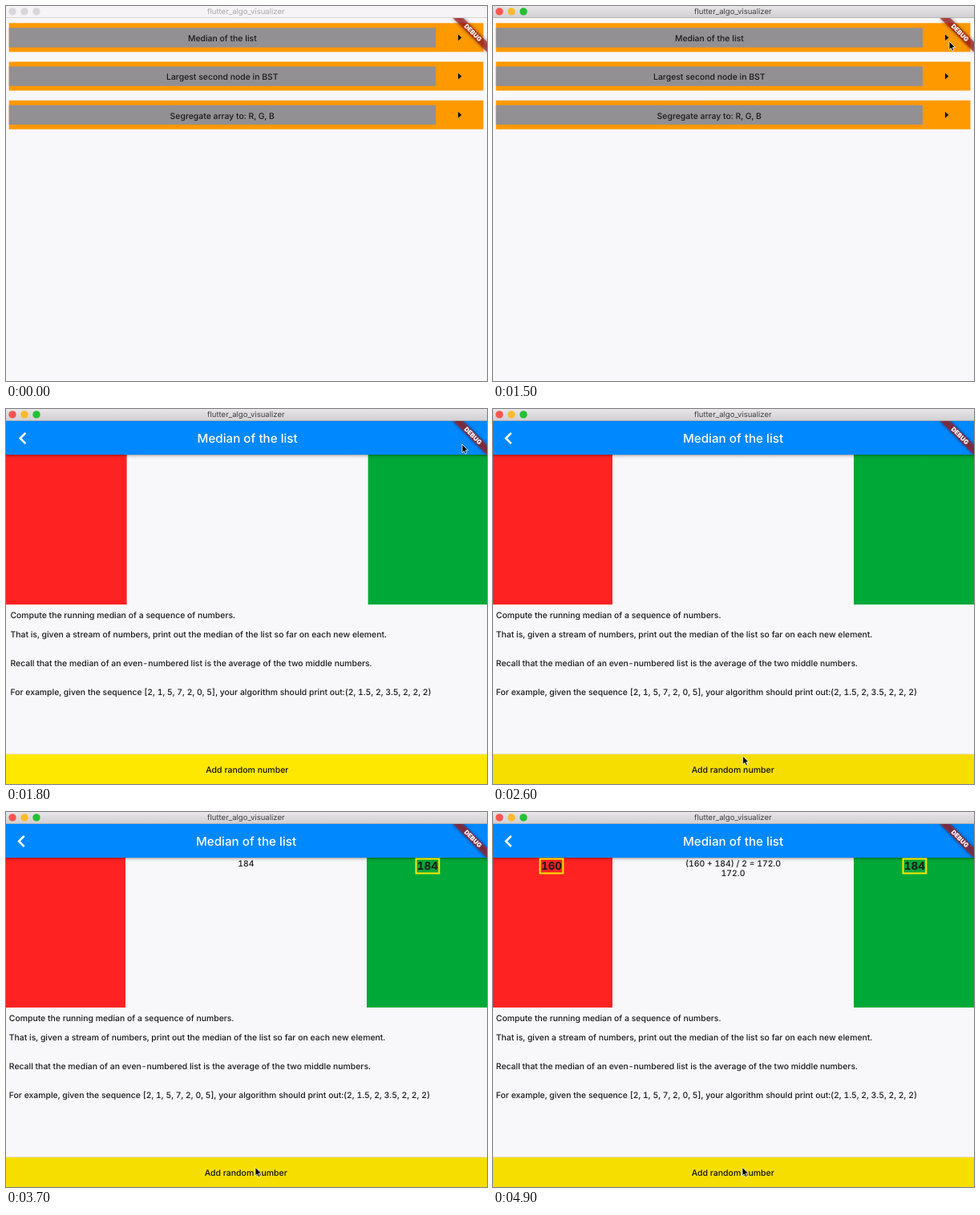
An HTML page for the animation above (5000 ms loop, 600 by 468 pixels).

```html
<!DOCTYPE html>
<html lang="en">
<head>
<meta charset="utf-8">
<title>flutter_algo_visualizer</title>
<style>
html, body { margin: 0; width: 100%; height: 100%; overflow: hidden; background: #f8f7f9; }
svg { display: block; width: 600px; height: 468px; }
text {
  font: 500 10.42px Inter, Roboto, sans-serif;
  font-variant-numeric: tabular-nums;
  fill: #1a1a1a;
  white-space: pre;
  text-rendering: geometricPrecision;
}
.mid { text-anchor: middle; }
.bar { font-size: 9.55px; font-weight: 400; }
.head { font-size: 15.2px; fill: #fff; }
.action { font-size: 10.5px; fill: #111; }
.num { font-size: 13.5px; font-weight: 700; }
.debug { font-size: 7.8px; font-weight: 900; fill: #fff; }
</style>
</head>
<body>
<svg viewBox="0 0 600 468" xmlns="http://www.w3.org/2000/svg">
  <defs>
    <linearGradient id="chrome" x2="0" y2="1">
      <stop stop-color="#e8e6e8"/><stop offset="1" stop-color="#d1cfd1"/>
    </linearGradient>
    <linearGradient id="edge">
      <stop stop-opacity="0"/><stop offset=".6" stop-opacity=".07"/><stop offset="1" stop-opacity=".24"/>
    </linearGradient>
    <linearGradient id="drop" x2="0" y2="1">
      <stop stop-opacity=".32"/><stop offset=".4" stop-opacity=".1"/><stop offset="1" stop-opacity="0"/>
    </linearGradient>
    <filter id="blur" x="-30%" y="-100%" width="160%" height="300%"><feGaussianBlur stdDeviation="2.2"/></filter>
    <clipPath id="button"><rect x="-2" y="431" width="606" height="37"/></clipPath>
    <clipPath id="body"><rect y="15" width="600" height="453"/></clipPath>
  </defs>
  <rect width="600" height="468" fill="#f8f7f9"/>

  <g id="list"></g>

  <g id="page">
    <rect x="-38" y="15" width="36" height="453" fill="url(#edge)"/>
    <rect x="-2" y="15" width="606" height="453" fill="#f8f7f9"/>
    <rect x="-2" y="57" width="151" height="187" fill="#ff2222"/>
    <rect x="450" y="57" width="154" height="187" fill="#00a937"/>
    <rect x="-2" y="57" width="606" height="5" fill="url(#drop)"/>
    <rect x="-2" y="15" width="606" height="42" fill="#0088ff"/>
    <path d="M22.7 29.9 16.1 36.5 22.7 43.1" fill="none" stroke="#fff" stroke-width="2.6"/>
    <text class="mid head" x="299.5" y="41.8">Median of the list</text>
    <g id="copy"></g>
    <g id="result"></g>
    <rect x="-2" y="430" width="606" height="1" fill="#e6e4e4"/>
    <rect id="fill" x="-2" y="431" width="606" height="37"/>
    <g clip-path="url(#button)"><circle id="ripple" cx="311" cy="446" fill="#c8c8c8"/></g>
    <text class="mid action" x="299.2" y="454">Add random number</text>
  </g>

  <g clip-path="url(#body)">
    <g transform="translate(600 15) rotate(45)">
      <rect x="-30" y="21" width="60" height="9" opacity=".5" filter="url(#blur)"/>
      <rect x="-30" y="21" width="60" height="9" fill="#b71c1c" fill-opacity=".65"/>
      <text class="mid debug" x=".5" y="28.1">DEBUG</text>
    </g>
  </g>

  <rect id="chromeBar" width="600" height="14.5"/>
  <rect id="chromeLine" y="14" width="600" height="1"/>
  <g id="lights"></g>
  <text id="name" class="mid bar" x="299.3" y="10.3">flutter_algo_visualizer</text>

  <path id="cursor" d="M0 0V10.6L2.4 8.4 4 12.1 5.8 11.3 4.2 7.7H7.5Z" stroke="#fff" stroke-width=".8"/>
</svg>
<script>
const LOOP = 5000, STEP = 100;
const $ = id => document.getElementById(id);
const set = (id, attrs) => {
  for (const k in attrs) $(id).setAttribute(k, attrs[k]);
};
const clamp = v => Math.max(0, Math.min(1, v));
const span = (t, a, b) => clamp((t - a) / (b - a));
const label = (s, x, y, cls = "") => `<text class="${cls}" x="${x}" y="${y}">${s}</text>`;

const rows = ["Median of the list", "Largest second node in BST", "Segregate array to: R, G, B"];
const copy = [
  [261, "Compute the running median of a sequence of numbers."],
  [285, "That is, given a stream of numbers, print out the median of the list so far on each new element."],
  [321, "Recall that the median of an even-numbered list is the average of the two middle numbers."],
  [357, "For example, given the sequence [2, 1, 5, 7, 2, 0, 5], your algorithm should print out:(2, 1.5, 2, 3.5, 2, 2, 2)"]
];

// time, x, y of the pointer tip
const path = [
  [0, 620, 150], [100, 612, 152], [400, 452, 190], [700, 452, 190],
  [800, 477, 103], [1200, 569, 44], [2300, 569, 44],
  [2600, 311.6, 433], [2900, 311, 443.4], [5000, 311, 443.4]
];

// press start, fade start, fade end, growth per ms
const taps = [[2950, 3200, 3400, 0.38], [3750, 4250, 4600, 0.42]];
const FIRST = 3100, SECOND = 4100;

$("list").innerHTML = rows.map((s, i) => `<g transform="translate(0 ${i * 48.25})">
  <rect x="3.7" y="21.3" width="591.8" height="36" fill="#ff9900"/>
  <rect x="3.7" y="27.2" width="532.4" height="24.4" fill="#929093"/>
  <path d="M564 35.5 568.3 39.4 564 43.3Z" fill="#111"/>
  ${label(s, 269.8, 44, "mid")}</g>`).join("");
$("copy").innerHTML = copy.map(([y, s]) => label(s, 3.8, y)).join("");
$("lights").innerHTML = [8, 23, 38].map(x => `<circle cx="${x}" cy="6.9" r="4.7"/>`).join("");

const badge = (n, x) => `<rect x="${x - 14.4}" y="58.5" width="28.8" height="18" fill="none"
  stroke="#ffe800" stroke-width="2"/>` + label(n, x, 72.4, "mid num");

// cubic ease solved by bisection on the x axis
function ease(p) {
  const at = (s, a, b) => 3 * s * (1 - s) ** 2 * a + 3 * s * s * (1 - s) * b + s ** 3;
  let lo = 0, hi = 1;
  for (let i = 0; i < 24; i++) {
    const m = (lo + hi) / 2;
    if (at(m, 0.35, 0.33) < p) lo = m; else hi = m;
  }
  return at(lo, 0.91, 0.97);
}

function pointer(t) {
  const i = Math.max(1, path.findIndex(k => k[0] >= t));
  const [t0, x0, y0] = path[i - 1], [t1, x1, y1] = path[i];
  const p = span(t, t0, t1);
  return `translate(${x0 + (x1 - x0) * p} ${y0 + (y1 - y0) * p})`;
}

function results(t) {
  if (t < FIRST) return "";
  const high = badge(184, 525.9);
  if (t < SECOND) return high + label("184", 299.3, 68.2, "mid");
  return high + badge(160, 73) + label("(160 + 184) / 2 = 172.0", 299.5, 68.2, "mid")
    + label("172.0", 299.5, 80.2, "mid");
}

let shown = null;
function draw(t) {
  const active = t >= 200;
  set("chromeBar", { fill: active ? "url(#chrome)" : "#f6f4f6" });
  set("chromeLine", { fill: active ? "#b4b2b4" : "#d6d4d6" });
  set("name", { style: `fill:${active ? "#404040" : "#a9a8a9"}` });
  const colors = active ? ["#ff5550", "#fcbb2d", "#25bf35"] : Array(3).fill("#d9d7d9");
  [...$("lights").children].forEach((c, i) => c.setAttribute("fill", colors[i]));

  const p = ease(span(t, 1517, 1817));
  const x = Math.max(600 * (1 - p), t < 2000 ? 1.5 : 0);
  set("page", { transform: `translate(${x} 0)`, visibility: t < 1517 ? "hidden" : "visible" });
  set("list", { transform: `translate(${-202 * p} 0)` });

  const tap = taps.find(k => t >= k[0] && t < k[2]);
  set("fill", { fill: t >= 2600 ? "#f6df00" : "#ffe800" });
  set("ripple", {
    r: tap ? (t - tap[0]) * tap[3] : 0,
    opacity: tap ? 0.4 * (1 - span(t, tap[1], tap[2])) : 0
  });

  const html = results(t);
  if (html !== shown) $("result").innerHTML = shown = html;
  set("cursor", { transform: pointer(t) });
}

const start = performance.now();
function tick(now) {
  const t = Math.max(0, now - start) % LOOP;
  draw(Math.floor(t / STEP) * STEP);
  requestAnimationFrame(tick);
}
draw(0);
requestAnimationFrame(tick);
</script>
</body>
</html>
```
